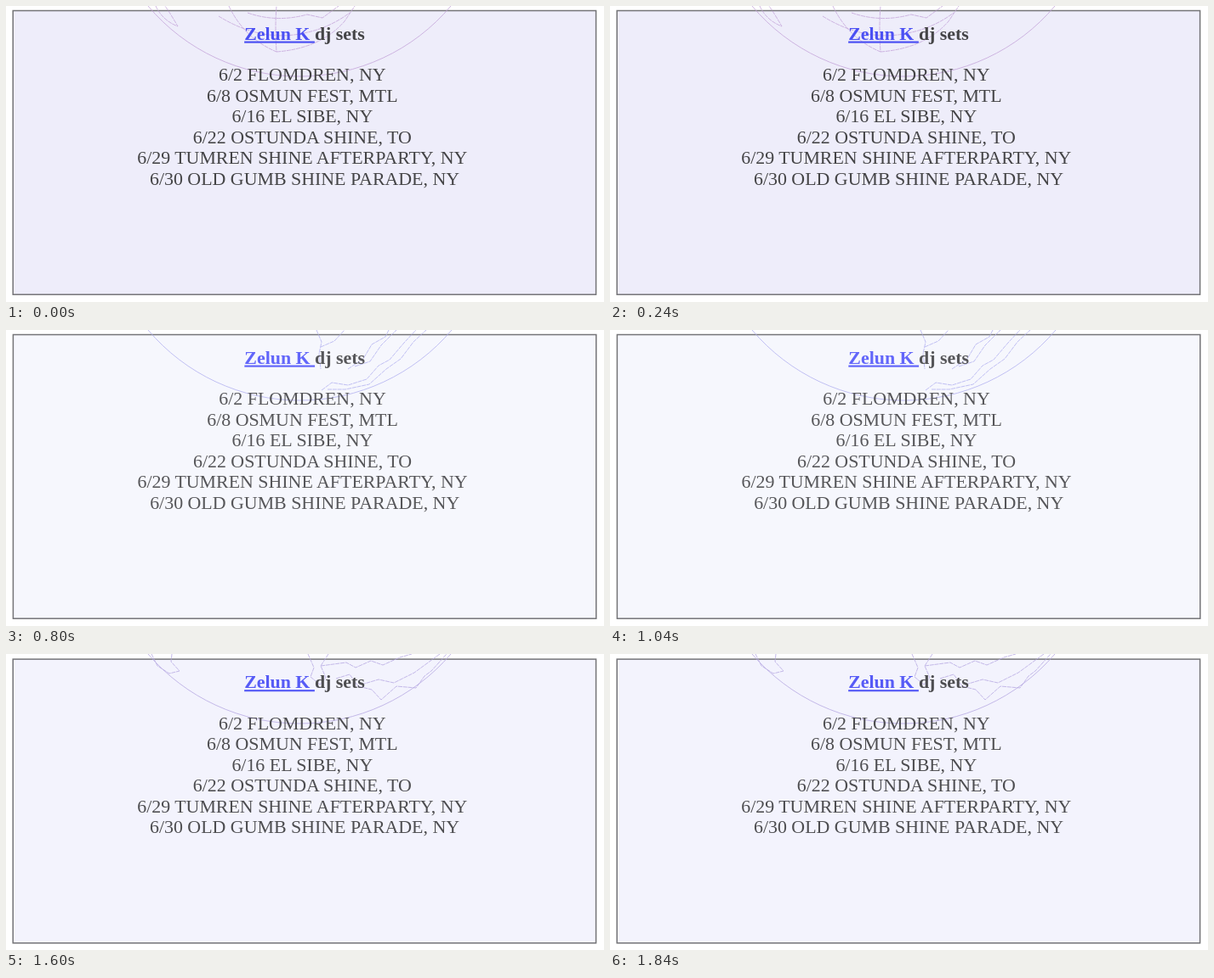
These frames come from a looping animation (703 px wide and 349 px high, 2000 ms). An HTML page:

```html
<!DOCTYPE html>
<html lang="en">
<head>
<meta charset="utf-8">
<title>DJ sets</title>
<style>
  html, body { margin: 0; width: 100%; height: 100%; overflow: hidden; background: #fff; }
  svg { display: block; width: 703px; height: 349px; }
  text { font: 21.9px "Liberation Serif", serif; text-anchor: middle; white-space: pre; }
  .title { font-weight: bold; }
  .link { text-decoration: underline; text-decoration-thickness: 1.4px; }
  #globe path { fill: none; stroke-width: .8; }
  #coast { stroke-dasharray: 5 .8; }
</style>
</head>
<body>
<svg viewBox="0 0 703 349">
  <g id="card">
    <rect id="panel" x="8.2" y="5.5" width="685.4" height="334.7" stroke="#747477" stroke-width="1.5"/>
  </g>
  <g id="globe">
    <path id="rim"/>
    <path id="coast"/>
  </g>
  <g id="copy">
    <text class="title" x="351" y="39.5"><tspan class="link">Zelun K </tspan>dj sets</text>
  </g>
</svg>
<script>
const STEP = 400;
const $ = id => document.getElementById(id);

const lines = [
  '6/2 FLOMDREN, NY',
  '6/8 OSMUN FEST, MTL',
  '6/16 EL SIBE, NY',
  '6/22 OSTUNDA SHINE, TO',
  '6/29 TUMREN SHINE AFTERPARTY, NY',
  '6/30 OLD GUMB SHINE PARADE, NY'
];
lines.forEach((line, i) => {
  const text = document.createElementNS('http://www.w3.org/2000/svg', 'text');
  text.setAttribute('x', i === lines.length - 1 ? 351 : 348.3);
  text.setAttribute('y', 88.3 + i * 24.5);
  text.textContent = line;
  $('copy').append(text);
});

// Each pose turns the globe, nudges the card and changes the tint.
const poses = [
  { shift: [0, 0], rim: [167, 523, 83], bg: '#eeedfa', ink: '#444446', link: '#4b50f3', line: '#c5a5da',
    coast: 'M176 0Q184 17 202 24Q194 10 187 0M262 0Q280 38 318 54Q316 25 318 0M318 54Q370 50 398 18L410 0M284 8Q318 20 354 10L372 14L391 0M250 12Q300 43 350 32Q380 26 404 8' },
  { shift: [.4, -.7], rim: [167, 523, 80], bg: '#eeedfa', ink: '#444446', link: '#4b50f3', line: '#bfa5dc',
    coast: 'M196 0L207 16L222 21L238 36L263 43L281 36L270 22L256 12L238 9L228 0M270 9Q315 18 350 39L374 45L383 36L366 27L350 23Q320 12 300 0M284 5L296 17L318 22L337 37L353 42' },
  { shift: [.2, 0], rim: [167, 524, 83], bg: '#f6f7fd', ink: '#565659', link: '#6266fa', line: '#b3b1f0',
    coast: 'M365 0L371 14L368 28L370 46M370 20L386 13L398 0M371 71L383 62L402 65L424 58L438 42L451 35L468 15L482 0M378 70L399 70L427 64L447 46L464 34L479 14L494 0M402 46L420 34L430 17L446 8L450 0M410 43L428 37L441 18L459 0' },
  { shift: [-.8, -.6], rim: [171, 527, 82], bg: '#efeefb', ink: '#444446', link: '#4b50f3', line: '#c4a7dc',
    coast: 'M174 0Q185 23 208 35Q198 16 184 0M226 0Q242 24 270 36M278 0Q296 32 330 50L348 57H374L381 51L376 40M492 0Q470 34 430 46M460 0Q444 27 408 44M368 8V52M375 8V46M303 0Q344 12 398 2M272 20Q350 30 456 18M316 0Q330 25 368 30Q402 22 420 0' },
  { shift: [0, .6], rim: [167, 523, 82], bg: '#f3f3fd', ink: '#4d4d50', link: '#565bf6', line: '#b6a9e2',
    coast: 'M171 0L178 14L192 23L204 20L194 9L195 0M355 0L362 16L358 27L369 36L376 28L370 14L379 0M370 14L400 10L411 16L429 8L443 13L463 4L477 0M388 29L404 24L414 38L430 42L441 54L459 38L482 40L492 26L500 20L518 0M418 36L438 30L456 34L480 22L510 0' }
];

// Lower part of a circle whose chord lies along the top edge.
function arc([left, right, depth]) {
  const half = (right - left) / 2;
  const radius = (half * half + depth * depth) / (2 * depth);
  return `M${left} 0A${radius} ${radius} 0 0 0 ${right} 0`;
}

let shown = -1;
function draw(now) {
  const index = Math.floor(now / STEP) % poses.length;
  if (index !== shown) {
    const pose = poses[shown = index];
    for (const id of ['card', 'copy']) $(id).setAttribute('transform', `translate(${pose.shift})`);
    $('panel').setAttribute('fill', pose.bg);
    $('copy').setAttribute('fill', pose.ink);
    document.querySelector('.link').setAttribute('fill', pose.link);
    $('globe').setAttribute('stroke', pose.line);
    $('rim').setAttribute('d', arc(pose.rim));
    $('coast').setAttribute('d', pose.coast);
  }
}

const start = performance.now();
function tick() {
  draw(performance.now() - start);
  requestAnimationFrame(tick);
}
tick();
</script>
</body>
</html>
```
